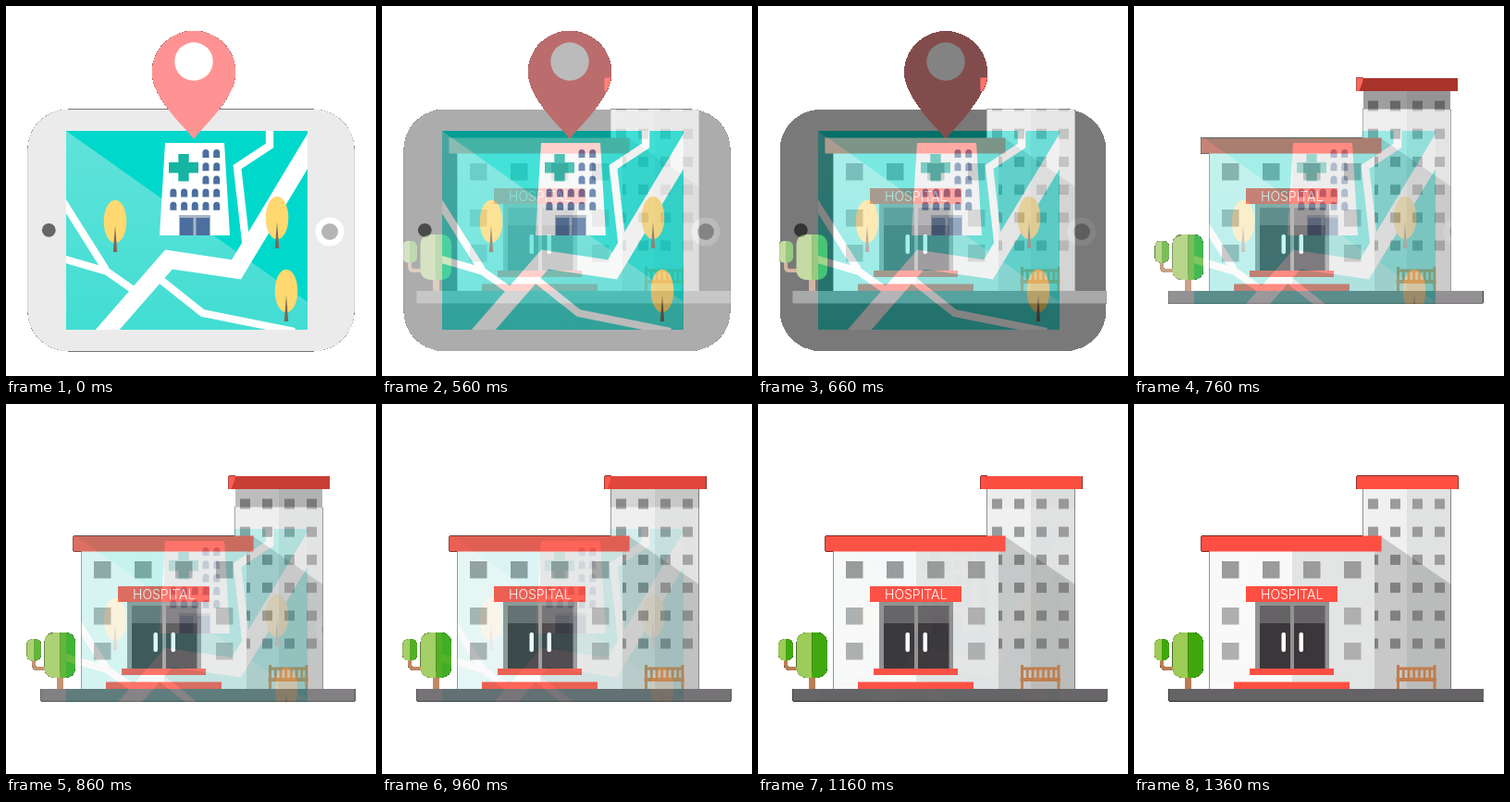
An HTML page with a canvas for the animation above (1.86 s loop, 400x400 px).

```html
<!DOCTYPE html>
<html lang="en">
<head>
<meta charset="utf-8">
<title>Hospital on the map</title>
<style>
html, body { margin: 0; width: 100%; height: 100%; overflow: hidden; background: #fff; }
canvas { display: block; width: 400px; height: 400px; }
</style>
</head>
<body>
<canvas id="stage" width="400" height="400"></canvas>
<script>
const SIZE = 400, LOOP = 1860, HOLD = 560, STEP = 100, STEPS = 9;
const stage = document.getElementById('stage').getContext('2d');
const RED = '#ff4f42', WOOD = '#c17d4d';
let g;

function rect(fill, x1, y1, x2, y2, r = 0) {
  g.fillStyle = fill;
  g.beginPath();
  g.roundRect(x1, y1, x2 - x1, y2 - y1, r);
  g.fill();
}

function path(fill, d) {
  g.fillStyle = fill;
  g.fill(new Path2D(d));
}

function line(color, width, d) {
  g.strokeStyle = color;
  g.lineWidth = width;
  g.stroke(new Path2D(d));
}

function oval(fill, x, y, rx, ry = rx) {
  g.fillStyle = fill;
  g.beginPath();
  g.ellipse(x, y, rx, ry, 0, 0, Math.PI * 2);
  g.fill();
}

function mapTree(x, y) {
  oval('#ffd970', x, y, 12.3, 23.3);
  path('#7b6857', `M${x} ${y + 4}L${x + 2.2} ${y + 33}h-4.4z`);
}

function mapHospital() {
  path('#fff', 'M172 148H236L242 248H166Z');
  rect('#16b5a3', 186.3, 160, 197.7, 189.5);
  rect('#16b5a3', 176, 169, 208, 180.5);
  for (let row = 0; row < 5; row++)
    for (let col = row < 3 ? 3 : 0; col < 5; col++) {
      const x = 177.4 + col * 11.7, y = 155 + row * 14.2;
      rect('#4a6fa1', x, y, x + 7, y + 9, [3.5, 3.5, 0, 0]);
    }
  rect('#a9b6c6', 187, 226, 221, 248);
  rect('#4c6f9f', 188, 229, 202.5, 248);
  rect('#4c6f9f', 205.5, 229, 220, 248);
}

function drawMap() {
  rect('#ebebeb', 23.1, 111.6, 376.9, 373.4, 44);
  oval('#666', 46.3, 242.3, 7.4);
  oval('#fff', 350, 244, 15.5);
  oval('#b5b5b5', 350, 244, 9);

  g.save();
  g.beginPath();
  g.rect(65, 135, 261, 215);
  g.clip();
  rect('#00d8cb', 65, 135, 326, 350);
  const shade = g.createLinearGradient(0, 135, 0, 350);
  shade.addColorStop(0, '#60e3da');
  shade.addColorStop(1, '#42ddd3');
  path(shade, 'M65 135L326 320V350H65Z');
  line('#fff', 19.5, 'M101 360L176 274L249 285L335 142');
  line('#fff', 8.4, 'M285 130V151L250 174L260 262');
  line('#fff', 8, 'M61 210.5L108 285');
  line('#fff', 8, 'M61 273L109 287L142 310');
  line('#fff', 8, 'M161 291L212.5 332L312 352');
  g.restore();

  mapHospital();
  mapTree(118, 233);
  mapTree(293, 229);
  mapTree(303, 308);
  path('#ff9393', 'M203 144C193 130 157.5 100 157.5 72A45.5 45.5 0 0 1 248.5 72C248.5 100 213 130 203 144Z');
  oval('#fff', 203, 60, 20.7);
}

function drawTower() {
  rect('#f0f0f0', 247.4, 91, 295, 308);
  rect('#e0e1e1', 295, 91, 342.6, 308);
  for (let row = 0; row < 6; row++)
    for (let col = 0; col < 4; col++) {
      const x = 253 + col * 24, y = 102.5 + row * 30.2;
      rect('#9b9b9b', x, y, x + 11, y + 11);
    }
  path('rgba(0,0,0,.17)', 'M259 143H267L342.6 195V308H259Z');
  rect(RED, 240.4, 77.4, 350.6, 92);
}

function drawFront() {
  rect('#f9f9f9', 81.4, 159, 171, 308);
  rect('#e3e4e4', 171, 159, 260, 308);
  const pane = (x, y, fill) => rect(fill, x, y, x + 18.5, y + 18.5);
  for (const x of [95, 139, 183, 227]) pane(x, 170, '#9b9b9b');
  for (const y of [220, 258]) [95, 227].forEach(x => pane(x, y, '#afafaf'));
  rect(RED, 72.4, 142.4, 267.6, 159.6);

  rect('#929292', 131, 214, 211, 287);
  for (const [a, b] of [[136, 169], [173, 206.5]]) {
    rect('#666366', a, 218, b, 237);
    rect('#3a363a', a, 237, b, 287);
  }
  rect('#fff', 159.5, 247, 164, 268, 2);
  rect('#fff', 178.5, 247, 183, 268, 2);
  rect(RED, 125, 286, 216, 293);
  rect(RED, 108, 300.4, 233, 308);

  rect(RED, 121, 197, 220, 214);
  g.fillStyle = '#fff';
  g.font = '300 14px Inter, Lato, sans-serif';
  g.textAlign = 'center';
  g.fillText('HOSPITAL', 170.7, 211);
}

function crown(x1, y1, x2, y2, r) {
  const mid = (x1 + x2) / 2;
  rect('#9ccb56', x1, y1, mid, y2, [r, 0, 0, r]);
  rect('#3fa70c', mid, y1, x2, y2, [0, r, r, 0]);
}

function drawGarden() {
  rect('#b97c52', 55, 290, 62, 308);
  line('#b97c52', 4, 'M30 275V282Q30 286 34 286H45');
  crown(41.5, 247, 75, 296, 10);
  crown(22, 254, 38, 277.5, 6);

  rect(WOOD, 284, 282, 287, 308);
  rect(WOOD, 323.5, 282, 326.5, 308);
  rect(WOOD, 284, 284.5, 326, 287.5);
  rect(WOOD, 283.5, 296, 327, 300);
  for (let i = 0; i < 6; i++) rect(WOOD, 290 + i * 5.7, 285, 292.6 + i * 5.7, 297);
}

function drawHospital() {
  drawTower();
  drawFront();
  drawGarden();
  rect('#666366', 37.4, 308, 378, 321.6);
}

function layer(draw) {
  const c = document.createElement('canvas');
  c.width = c.height = SIZE;
  g = c.getContext('2d', { willReadFrequently: true });
  draw();
  return g.getImageData(0, 0, SIZE, SIZE).data;
}

const map = layer(drawMap);
const hospital = layer(drawHospital);
const out = stage.createImageData(SIZE, SIZE);

// Both layers add up over black; anything less than half opaque shows the page.
function render(step) {
  const mix = 1 - (1 - step / STEPS) ** 2.65;
  const px = out.data;
  for (let i = 0; i < px.length; i += 4) {
    const a = map[i + 3] / 255 * (1 - mix);
    const b = hospital[i + 3] / 255 * mix;
    const solid = a + b >= 0.5;
    for (let c = i; c < i + 3; c++) px[c] = solid ? map[c] * a + hospital[c] * b : 255;
    px[i + 3] = 255;
  }
  stage.putImageData(out, 0, 0);
}

const start = performance.now();
let shown = -1;

function tick() {
  const t = (performance.now() - start) % LOOP;
  const step = t < HOLD ? 0 : Math.min(STEPS, Math.floor((t - HOLD) / STEP) + 1);
  if (step !== shown) render(shown = step);
  requestAnimationFrame(tick);
}
tick();
</script>
</body>
</html>
```
